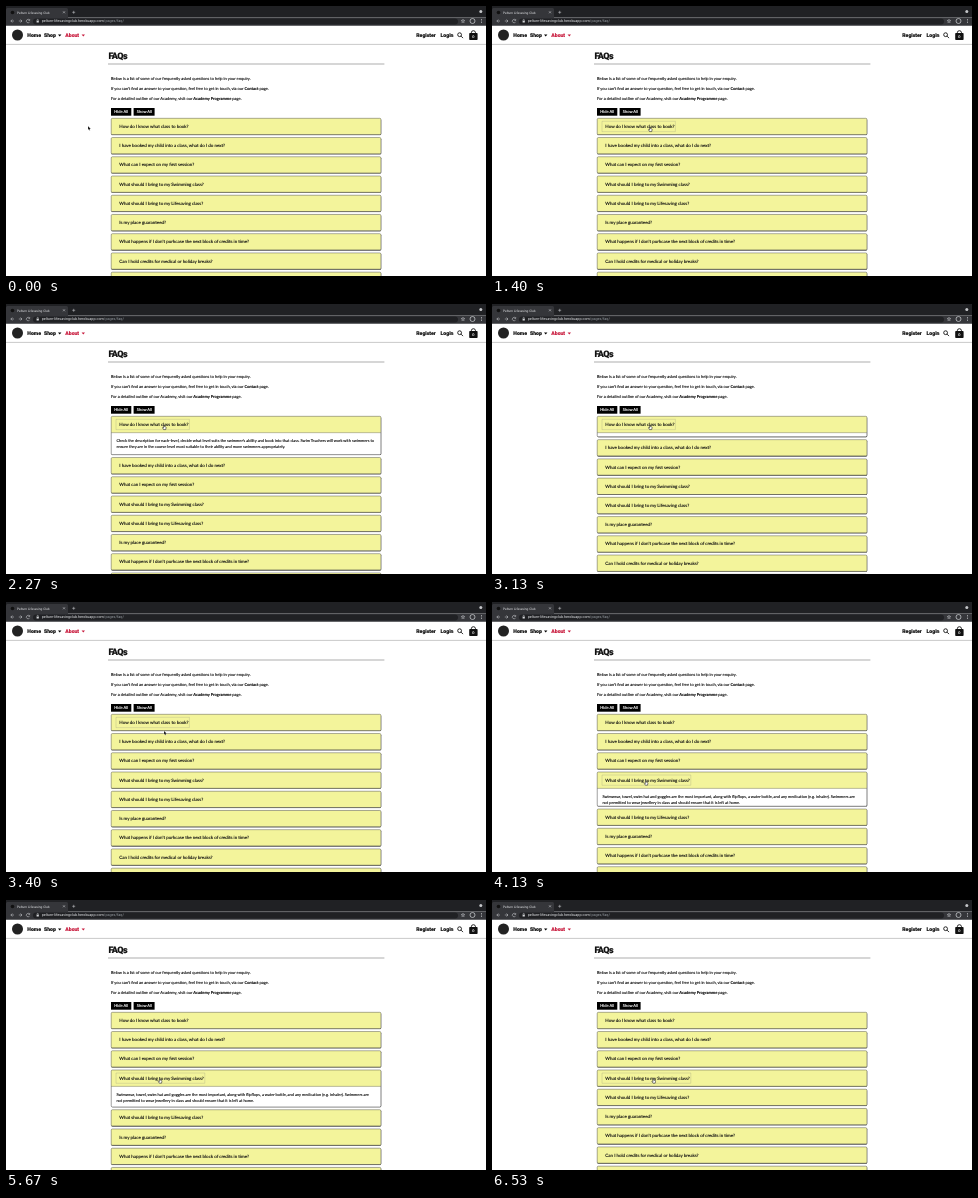
Write an HTML page that moves like this. It is 480x270 px and loops after 6590 ms.

```html
<!DOCTYPE html>
<html lang="en">
<head>
<meta charset="utf-8">
<title>FAQs</title>
<style>
  html, body { margin: 0; width: 100%; height: 100%; overflow: hidden; background: #fff; }
  svg { display: block; width: 100%; height: 100%; }
  text {
    font: 4px Lato, sans-serif; color: #111; fill: currentColor; stroke: currentColor; stroke-width: .13;
    text-rendering: geometricPrecision; white-space: pre;
  }
  .question { font-size: 4.48px; }
  .answer { font-size: 3.94px; }
  .nav { font: 900 5.1px Roboto, sans-serif; }
  .heading { font: 900 9px Roboto, sans-serif; letter-spacing: -.6px; }
  .chrome { font: 3.2px Roboto, sans-serif; color: #e8eaed; stroke: none; }
  .url { font-size: 3.72px; }
  .light { color: #fff; }
  .line { fill: none; stroke: #d5d7da; stroke-width: .5; }
</style>
</head>
<body>
<svg viewBox="0 0 480 270">
  <rect width="480" height="270" fill="#fff"/>

  <!-- Page heading and introduction -->
  <text class="heading" x="102.4" y="53.2">FAQs</text>
  <path d="M102 58H378.4" stroke="#777" stroke-width=".6"/>
  <text x="105" y="73.5">Below is a list of some of our frequently asked questions to help in your enquiry.</text>
  <text x="105" y="83.6">If you can't find an answer to your question, feel free to get in touch, via our <tspan font-weight="700">Contact</tspan> page.</text>
  <text x="105" y="93.6">For a detailed outline of our Academy, visit our <tspan font-weight="700">Academy Programme</tspan> page.</text>
  <rect x="105" y="102" width="20.3" height="7.7"/>
  <rect x="127.6" y="102" width="21" height="7.7"/>
  <text class="light" x="108.3" y="107.2">Hide All</text>
  <text class="light" x="130.8" y="107.2">Show All</text>

  <g id="list"></g>
  <rect id="focus" fill="none" stroke="#777" stroke-width=".4" stroke-dasharray=".5 .5"/>

  <!-- Site navigation -->
  <path d="M0 38.4H480" stroke="#bbb" stroke-width=".8"/>
  <circle cx="11.5" cy="29" r="5.5" fill="#222"/>
  <text class="nav" x="21.3" y="31.3">Home</text>
  <text class="nav" x="38" y="31.3">Shop</text>
  <path d="M52 28.6h3.4l-1.7 1.8z"/>
  <text class="nav" x="59.3" y="31.3" style="color:#c8193c">About</text>
  <path d="M75.6 28.6H79l-1.7 1.8z" fill="#c8193c"/>
  <text class="nav" x="410.3" y="31.3">Register</text>
  <text class="nav" x="434.6" y="31.3">Login</text>
  <g fill="none" stroke="#111" stroke-width=".9">
    <circle cx="453.6" cy="28.7" r="1.9"/>
    <path d="M455 30.1l2 2"/>
    <path d="M465.3 28v-1.2a2.1 2.1 0 0 1 4.2 0V28"/>
  </g>
  <rect x="463.2" y="27" width="8.4" height="7" rx=".8" fill="#111"/>
  <text class="light" x="466.3" y="32" style="font-size:3.6px">0</text>

  <!-- Browser window -->
  <rect width="480" height="11.5" fill="#202124"/>
  <path d="M0 11.5V3.5Q0 2 1.5 2H60.5Q62 2 62 3.5V11.5H480V19.8H0z" fill="#35363a"/>
  <circle cx="6.5" cy="6.5" r="1.8" fill="#111"/>
  <circle cx="474.8" cy="5.6" r="1.5" fill="#c4c6c9"/>
  <text class="chrome" x="11" y="7.5">Pelturn Lifesaving Club</text>
  <rect x="27" y="12.4" width="425" height="6" rx="3" fill="#202124"/>
  <path class="line" d="M57 5.3l2 2m0-2l-2 2M66.200 6.300h3m-1.500-1.500v3"/>
  <path class="line" d="M8 15H4.800m1.500-1.500L4.800 15l1.500 1.500M12.800 15H16m-1.500-1.500L16 15l-1.500 1.500"/>
  <path class="line" d="M23.500 14.200a1.700 1.700 0 1 0 .1 1.600M23.700 13v1.400h-1.400"/>
  <rect x="30.600" y="14.700" width="2.200" height="1.800" fill="#d5d7da"/>
  <path class="line" d="M31 14.700v-.6a.7.7 0 0 1 1.400 0v.6"/>
  <text class="chrome url" x="35.7" y="16.4">pelturn-lifesavingclub.herokuapp.com<tspan fill="#9aa0a6">/pages/faq/</tspan></text>
  <path class="line" d="M457 13.300l.5 1.100 1.200.1-.9.800.3 1.200-1.100-.6-1.100.6.3-1.200-.9-.8 1.200-.1z"/>
  <circle class="line" cx="466.5" cy="15" r="2.5" style="stroke-width:.7"/>
  <path d="M475.5 13.2v.8m0 .6v.8m0 .6v.8" stroke="#d5d7da" stroke-width=".8"/>

  <path id="arrow" d="M0 0V4L.9 3.2 1.5 4.6 2.2 4.3 1.6 2.9H2.8z" fill="#000" stroke="#fff" stroke-width=".25"/>
  <path id="hand" d="M-.4 0Q0-.5.4 0V1.5L1.800 1.900Q2.200 2.100 2.100 2.700L1.700 4.600H-.4L-1.500 2.900Q-1.500 2.200-1 2.400L-.4 2.900z" fill="#fff" stroke="#000" stroke-width=".5"/>
</svg>

<script>
const LOOP = 6590, STEP = 66.57;
const TOP = 112.3, PITCH = 19.23, HEAD = 16.4, ANSWER = 22;
const $ = id => document.getElementById(id);

const questions = [
  "How do I know what class to book?",
  "I have booked my child into a class, what do I do next?",
  "What can I expect on my first session?",
  "What should I bring to my Swimming class?",
  "What should I bring to my Lifesaving class?",
  "Is my place guaranteed?",
  "What happens if I don't purhcase the next block of credits in time?",
  "Can I hold credits for medical or holiday breaks?",
  ""
];
const answers = {
  0: ["Check the description for each-level, decide what level suits the swimmer's ability and book into that class. Swim Teachers will work with swimmers to",
      "ensure they are in the course level most suitable to their ability and move swimmers appropriately."],
  3: ["Swimwear, towel, swim hat and goggles are the most important, along with flipflops, a water bottle, and any medication (e.g. inhaler). Swimmers are",
      "not permitted to wear jewellery in class and should ensure that it is left at home."]
};
// Opening and closing start times of each answer
const toggles = { 0: [1420, 2950], 3: [3950, 5630] };

// Cursor keys: time, x, y
const cursorPath = [
  [0, 82, 120], [670, 248, 242], [870, 290, 200], [1130, 158, 121],
  [3290, 158, 121], [3400, 158, 128.8], [3600, 158, 150], [3900, 153.8, 178.6],
  [6340, 153.8, 178.6], [6530, 161.5, 178.6]
];

function add(parent, tag, attrs, text) {
  const node = document.createElementNS("http://www.w3.org/2000/svg", tag);
  set(node, attrs);
  if (text) node.textContent = text;
  return parent.appendChild(node);
}
function set(node, attrs) {
  for (const key in attrs) node.setAttribute(key, attrs[key]);
}

const rows = questions.map((question, i) => {
  const group = add($("list"), "g", {});
  const box = attrs => add(group, "rect", { x: 105.2, width: 269.7, height: HEAD, rx: 1.2, ...attrs });
  const shadow = box({ x: 105.5, y: .4, fill: "#444" });
  const panel = box({ fill: "#fff" });
  let clip;
  if (answers[i]) {
    const clipPath = add(group, "clipPath", { id: "clip" + i });
    clip = add(clipPath, "rect", { x: 105, y: HEAD, width: 270 });
    const body = add(group, "g", { "clip-path": `url(#clip${i})` });
    answers[i].forEach((line, n) => add(body, "text", { class: "answer", x: 110.4, y: 25.7 + n * 6 }, line));
  }
  box({ fill: "#f3f49b" });
  add(group, "path", { d: `M105.2 ${HEAD}h269.7`, stroke: "#444", "stroke-width": .35 });
  const frame = box({ fill: "none", stroke: "#333", "stroke-width": .4 });
  add(group, "text", { class: "question", x: 113.3, y: 9.7 }, question);
  return { group, clip, boxes: [shadow, panel, frame] };
});

const clamp = v => Math.max(0, Math.min(1, v));

// The standard CSS "ease" curve
function ease(x) {
  if (x <= 0 || x >= 1) return clamp(x);
  const bezier = (a, b, s) => 3 * (1 - s) ** 2 * s * a + 3 * (1 - s) * s * s * b + s ** 3;
  let low = 0, high = 1;
  for (let i = 0; i < 20; i++) {
    const mid = (low + high) / 2;
    if (bezier(.25, .25, mid) < x) low = mid; else high = mid;
  }
  return bezier(.1, 1, low);
}

function openness(i, t) {
  if (!toggles[i]) return 0;
  const [open, close] = toggles[i];
  return ease((t - open) / 350) - ease((t - close) / 350);
}

function cursorAt(t) {
  const next = cursorPath.findIndex(key => key[0] > t);
  if (next < 0) return cursorPath[cursorPath.length - 1].slice(1);
  const [t0, x0, y0] = cursorPath[next - 1], [t1, x1, y1] = cursorPath[next];
  const u = clamp((t - t0) / (t1 - t0)), s = u * u * (3 - 2 * u);
  return [x0 + (x1 - x0) * s, y0 + (y1 - y0) * s];
}

function render(t) {
  let shift = 0, overRow = false;
  const [x, y] = cursorAt(t);
  rows.forEach(({ group, clip, boxes }, i) => {
    const extra = ANSWER * openness(i, t), top = TOP + i * PITCH + shift;
    set(group, { transform: `translate(0 ${top})` });
    boxes.forEach(box => set(box, { height: HEAD + extra }));
    if (clip) set(clip, { height: extra });
    if (x > 105 && x < 375 && y > top && y < top + HEAD) overRow = true;
    shift += extra;
  });

  const second = t >= 3900;
  set($("focus"), {
    x: 110, y: second ? 173 : 115.3, width: second ? 88.8 : 73.4, height: 10.3,
    visibility: t >= 1325 ? "visible" : "hidden"
  });
  for (const id of ["arrow", "hand"]) {
    set($(id), {
      transform: `translate(${x} ${y})`,
      visibility: (id === "hand") === overRow ? "visible" : "hidden"
    });
  }
}

const start = performance.now();
function tick() {
  const t = (performance.now() - start) % LOOP;
  render(Math.floor(t / STEP) * STEP);
  requestAnimationFrame(tick);
}
tick();
</script>
</body>
</html>
```
